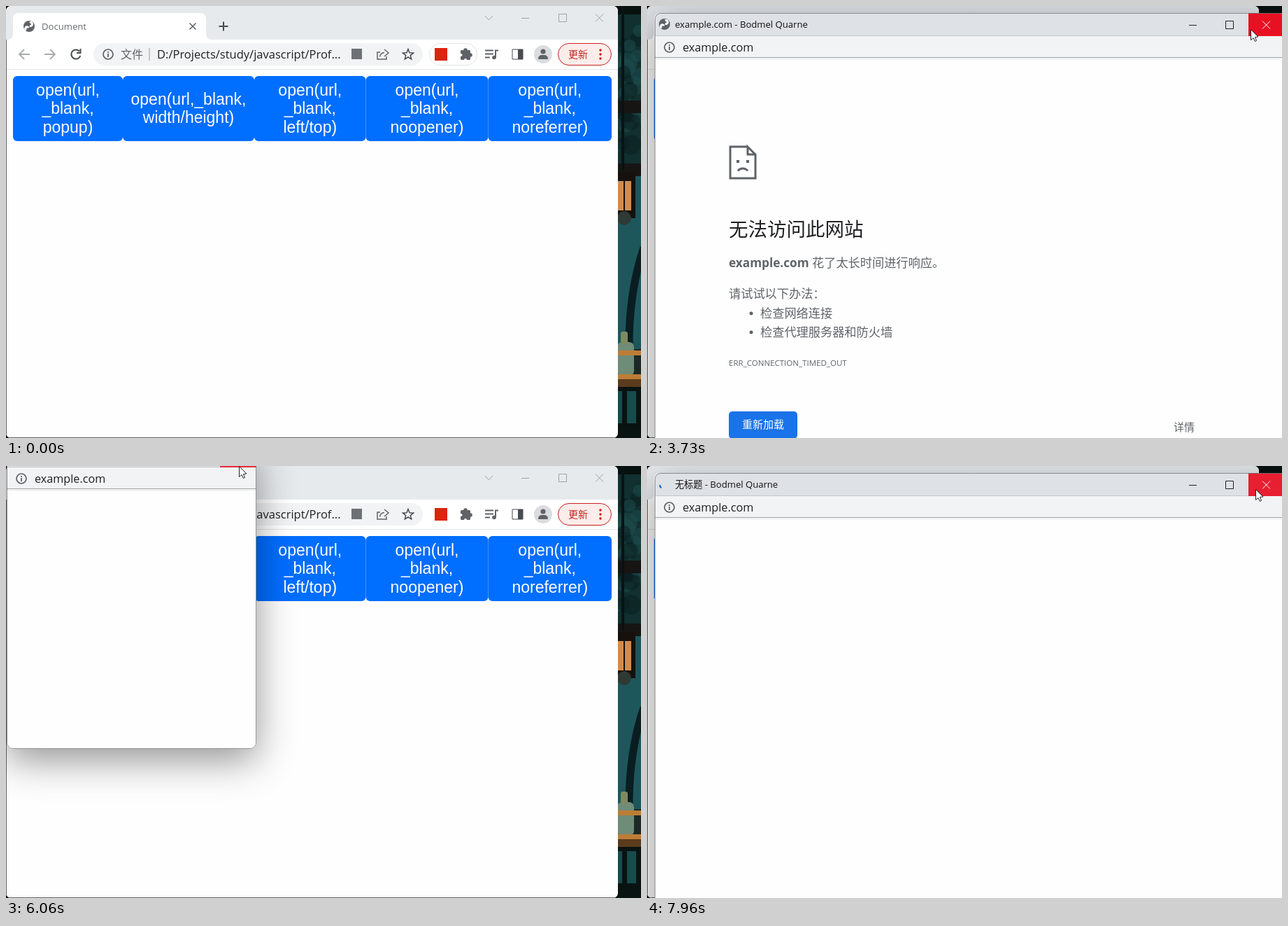
An HTML page with a canvas that plays this animation: 908x617 px, repeating every 8 s.

```html
<!DOCTYPE html>
<html lang="zh">
<head>
<meta charset="utf-8">
<title>window.open</title>
<style>
html, body { margin: 0; width: 100%; height: 100%; overflow: hidden; background: #07110f; }
canvas { display: block; }
</style>
</head>
<body>
<canvas id="stage" width="908" height="617"></canvas>
<script>
const W = 908, H = 617, LOOP = 8000, TAU = 2 * Math.PI;
const makeCanvas = () => Object.assign(document.createElement('canvas'), { width: W, height: H });
const screen2d = document.getElementById('stage').getContext('2d');
const layer = makeCanvas(), layer2d = layer.getContext('2d');
let c = screen2d;

const UI = '"Open Sans","Noto Sans CJK SC","Noto Sans CJK",sans-serif';
const ARIAL = '"Liberation Sans",Arial,sans-serif';
const BROWSER = 'Bodmel Quarne';
const GREY = '#5f6368', DARK = '#484b4f', INK = '#202124', RED = '#c5221f';

const clamp = v => Math.max(0, Math.min(1, v));
const mix = (a, b, p) => a + (b - a) * p;
const smooth = p => p * p * (3 - 2 * p);

// y is the middle of the capitals
function text(s, x, y, size, color, { align = 'left', font = UI, weight = 400 } = {}) {
  c.font = `${weight} ${size}px ${font}`;
  c.textAlign = align;
  c.fillStyle = color;
  c.fillText(s, x, y + size * 0.355);
}
function rect(x, y, w, h, fill) { c.fillStyle = fill; c.fillRect(x, y, w, h); }
function stroke(color, width = 1) { c.strokeStyle = color; c.lineWidth = width; c.stroke(); }
function box(x, y, w, h, r, fill, edge) {
  c.beginPath();
  c.roundRect(x, y, w, h, r);
  if (fill) { c.fillStyle = fill; c.fill(); }
  if (edge) stroke(edge);
}
function disc(x, y, r, fill) { c.beginPath(); c.arc(x, y, r, 0, TAU); c.fillStyle = fill; c.fill(); }
function arc(x, y, r, from, to, color, width) {
  c.beginPath(); c.arc(x, y, r, from, to); stroke(color, width);
}
function line(points, color, width = 1) {
  c.beginPath();
  for (const [x, y] of points) c.lineTo(x, y);
  stroke(color, width);
}
function cross(x, y, r, color, width = 1) {
  for (const s of [-1, 1]) line([[x - r, y - r * s], [x + r, y + r * s]], color, width);
}

function infoIcon(x, y) {
  arc(x, y, 7, 0, TAU, GREY, 1.7);
  rect(x - 0.9, y - 1, 1.8, 5, GREY);
  rect(x - 0.9, y - 4, 1.8, 1.9, GREY);
}
function globe(x, y) {
  disc(x, y, 8, GREY);
  arc(x - 3, y + 3, 2.2, 2, 6, '#fff', 3);
  arc(x + 2, y - 3, 2.5, -2, 2, '#fff', 3);
}
function windowButtons(x, y, gap, color, closeColor) {
  const min = x - 2 * gap;
  line([[min - 5.5, y + .5], [min + 5.5, y + .5]], color);
  box(Math.floor(x - gap - 5.5) + .5, y - 5.5, 11, 11, 0, null, color);
  cross(x, y, 5.5, closeColor);
}

// Night scene behind the window; only a strip at the right shows
function paintWallpaper() {
  const x = 874, w = W - x;
  let seed = 7;
  const rnd = () => (seed = seed * 16807 % 2147483647) / 2147483647;
  rect(0, 0, W, H, '#07110f');
  rect(x, 12, w, 215, '#11302f');
  rect(x, 238, w, 252, '#1d575c');
  for (let i = 0; i < 26; i++) {
    c.globalAlpha = 0.5;
    disc(x + w * rnd(), 25 + 190 * rnd(), 5 + 10 * rnd(), i % 2 ? '#0a1c1d' : '#1e4d50');
  }
  c.globalAlpha = 1;
  for (const y of [135, 225]) rect(x, y, w, 18, '#161514');
  rect(880, 0, 4, 235, '#081313');

  rect(x, 237, 26, 66, '#16110d');
  for (const px of [x, 885]) rect(px, 250, 9, 42, '#d08c50');
  disc(884, 303, 10, '#303a35');

  c.beginPath(); c.moveTo(912, 345); c.quadraticCurveTo(890, 410, 891, 492); stroke('#0a1d20', 11);
  rect(x, 490, w, 54, '#1c2a26');
  box(x, 480, 24, 48, 7, '#6f8c78');
  box(879, 465, 10, 18, 3, '#7f8a62');
  for (const y of [492, 526]) rect(x, y, w, 7, '#bd7d35');
  rect(x, 533, w, 11, '#5a3c1d');
  rect(x, 544, w, 73, '#091311');
  for (const px of [868, 888]) rect(px, 550, 13, 46, '#184b4c');
}
const backdrop = makeCanvas();
c = backdrop.getContext('2d');
paintWallpaper();

function arrow(x, dir) {
  const tip = x + 7.5 * dir;
  line([[x - 7.5 * dir, 69], [tip, 69]], '#a7aaad', 1.8);
  line([[tip - 7 * dir, 62], [tip, 69], [tip - 7 * dir, 76]], '#a7aaad', 1.8);
}
function star(x, y) {
  c.beginPath();
  for (let i = 0; i < 10; i++) {
    const a = i * TAU / 10 - TAU / 4, r = i % 2 ? 3.5 : 8;
    c.lineTo(x + r * Math.cos(a), y + r * Math.sin(a));
  }
  c.closePath();
  stroke(DARK, 1.5);
}
function toolbar(pill) {
  arrow(26.5, -1);
  arrow(62.5, 1);
  arc(100, 69, 6.6, 0.3, 5.6, DARK, 2);
  line([[106.5, 61], [106.5, 67], [101, 67]], DARK, 2);

  box(125, 53, 471, 32, 16, '#f1f3f4');
  infoIcon(146, 69);
  text('文件', 164, 69, 16, GREY);
  rect(204.5, 60, 1, 18, '#9a9da1');
  text('D:/Projects/study/javascript/Prof...', 216, 69, 16.5, INK);
  rect(494, 61, 15, 15, '#6d7175');
  line([[535, 66], [531, 66], [531, 76], [544, 76], [544, 72]], GREY, 1.5);
  arc(541, 73, 6.5, 3.2, 4.7, GREY, 1.5);
  line([[541, 62], [547, 67], [541, 72]], GREY, 1.5);
  star(575, 69.5);

  if (pill) box(605.5, 53.5, 68, 31, 16, '#fff', '#e1e3e6');
  rect(613, 60, 18, 18, '#dc2410');
  box(650, 63, 14, 14, 1.5, GREY);
  disc(657, 63, 2.8, GREY); disc(664, 70, 2.8, GREY);
  disc(650.5, 70, 2, '#fff'); disc(657, 77, 2, '#fff');
  for (let i = 0; i < 3; i++) rect(685, 62.5 + 5 * i, i < 2 ? 12 : 7, 2, GREY);
  line([[704, 63.5], [700, 63.5], [700, 73]], GREY, 2);
  disc(698, 73.5, 2.8, GREY);
  box(724, 62, 15, 14, 0, null, DARK);
  rect(732, 62, 7, 14, DARK);
  disc(768, 69, 13, '#dadce0');
  disc(768, 65, 3.6, GREY);
  box(761, 70, 14, 6, [5, 5, 1, 1], GREY);
  box(789.5, 53.5, 76, 31, 15.5, '#fcecea', RED);
  text('更新', 804, 69.5, 14, RED);
  for (let i = -1; i < 2; i++) disc(850, 69 + 6 * i, 1.8, RED);
}

function pageButtons() {
  const labels = ['|popup)', 'width/height)', '|left/top)', '|noopener)', '|noreferrer)'];
  const edges = [10, 167, 355, 514.5, 689.5, 866];
  labels.forEach((label, n) => {
    const x = edges[n], w = edges[n + 1] - x;
    box(x, 100, w, 93, 6, '#006eff');
    const rows = (label[0] === '|' ? 'open(url,|_blank,' : 'open(url,_blank,|') + label;
    rows.split('|').forEach((row, i, all) =>
      text(row, x + w / 2, 146.1 + 26.4 * (i - (all.length - 1) / 2), 23, '#fff', { align: 'center', font: ARIAL }));
  });
}

function mainWindow(active, pill) {
  const ink = active ? INK : '#a0a3a7';
  const bar = active ? '#dee1e6' : '#e7eaed';
  c.save();
  c.beginPath(); c.roundRect(0, 0, 875, H, 7); c.clip();
  rect(0, 0, 875, H, '#fefefe');
  rect(0, 0, 875, 48, bar);
  box(10, 10, 276, 46, 8, '#fff');
  for (const x of [2, 286]) rect(x, 40, 8, 8, '#fff');
  for (const x of [2, 294]) disc(x, 40, 8, bar);
  rect(0, 48, 875, 42, '#fff');
  globe(33, 29);
  text('Document', 51, 29, 13.1, active ? '#303236' : '#66696d');
  cross(267, 29, 4.5, active ? INK : GREY, 1.6);
  rect(304.5, 28, 13, 2, DARK);
  rect(310, 22.5, 2, 13, DARK);
  line([[685, 14], [690.5, 20], [696, 14]], ink);
  windowButtons(848.5, 17, 53, ink, ink);
  toolbar(pill);
  rect(0, 90, 875, 1, '#e3e5e8');
  pageButtons();
  rect(0, 48, 1, H, '#5d6263');
  rect(0, H - 1, 875, 1, '#5d6263');
  c.restore();
}

function errorPage() {
  const x = 117, size = 17.2;
  line([[144, 201], [119, 201], [119, 246], [155, 246], [155, 212], [144, 201], [144, 212], [155, 212]], GREY, 3);
  for (const px of [128, 142]) rect(px, 220, 4, 4, GREY);
  arc(137, 241, 9, 3.8, 5.6, GREY, 3);
  text('无法访问此网站', x, 319, 27.5, INK);
  text('example.com', x, 367, size, GREY, { weight: 700 });
  text('花了太长时间进行响应。', x + c.measureText('example.com ').width, 367, size, GREY);
  text('请试试以下办法：', x, 411, size, GREY);
  ['检查网络连接', '检查代理服务器和防火墙'].forEach((s, i) => {
    disc(149, 439 + 27 * i, 2.5, GREY);
    text(s, 162, 439 + 27 * i, size, GREY);
  });
  text('ERR_CONNECTION_TIMED_OUT', x, 510, 11.5, GREY);
  box(x, 579, 98, 39, 5, '#1a73e8');
  text('重新加载', x + 49, 598, 15, '#fff', { align: 'center' });
  text('详情', 768, 602, 15, GREY, { align: 'center' });
}

function spinner(x, y, age) {
  const mid = 3.58 + 0.0074 * (age - 160);
  const half = 1.13 + 0.79 * Math.cos(TAU * (age - 160) / 1333);
  arc(x, y, 7, mid - half, mid + half, '#2f6fca', 2.4);
}

const BIG = { x: 11, y: 10, w: 901, h: 760 };
const SMALL = { x: 1, y: -31, w: 357, h: 435 };
const POPUPS = [
  { ...BIG, open: 1120, close: 3740, loaded: 3000, hover: 2230 },
  { ...SMALL, open: 4230, close: 6380, loaded: LOOP, hover: 5950 },
  { ...BIG, open: 7080, close: LOOP, loaded: LOOP, hover: 7840 }
];

function popup(p, t) {
  const { x, y, w, h } = p, cx = x + w / 2, cy = y + h / 2;
  const age = t - p.open, rise = clamp(age / 270), fall = clamp((t - p.close) / 167);
  if (age < 0 || fall === 1) return;
  const scale = 1 - 0.1 * (1 - rise) ** 3 - 0.045 * fall;
  const hover = clamp((t - p.hover) / 130), done = t >= p.loaded;

  c = layer2d;
  c.clearRect(0, 0, W, H);
  c.save();
  c.translate(cx, cy); c.scale(scale, scale); c.translate(-cx, -cy);
  c.shadowColor = 'rgba(0,0,0,.42)'; c.shadowBlur = 54; c.shadowOffsetY = 16;
  box(x, y, w, h, 8, '#fefefe');
  c.shadowColor = 'transparent';
  c.save();
  c.clip();
  rect(x, y, w, 33, '#dee1e6');
  rect(x, y + 33, w, 31, '#f1f3f4');
  rect(x, y + 32, w, 1, '#c3c6ca');
  rect(x, y + 63, w, 1, '#a0a3a6');
  rect(x, y + 65, w, 1, '#e4e5e7');
  c.globalAlpha = hover;
  rect(x + w - 52, y, 52, 33, '#e81123');
  c.globalAlpha = 1;
  if (done) globe(x + 14, y + 16); else spinner(x + 14, y + 16, age);
  text(`${done ? 'example.com' : '无标题'} - ${BROWSER}`, x + 29, y + 16, 13.1, '#111');
  windowButtons(x + w - 26.5, y + 17, 52.5, INK, hover > .5 ? '#fff' : INK);
  infoIcon(x + 21, y + 49);
  text('example.com', x + 40, y + 49, 16.2, INK);
  if (done) errorPage();
  c.restore();
  box(x + .5, y + .5, w - 1, h - 1, 8, null, 'rgba(110,114,118,.75)');
  c.restore();

  c = screen2d;
  c.globalAlpha = clamp(rise * 1.8) * (1 - fall);
  c.drawImage(layer, 0, 0);
  c.globalAlpha = 1;
}

// pointer stops: arrive, leave, x, y
const STOPS = [
  [120, 120, 833, 618], [880, 1380, 106, 157], [1720, 1720, 690, 46], [2250, 2250, 878, 2],
  [2500, 3690, 888, 29], [3900, 3900, 636, 69], [4130, 4480, 290, 150], [4720, 4720, 458, 86],
  [4900, 4900, 570, 70], [5270, 5300, 335, 9], [5700, 6400, 333, 0], [6760, 6760, 408, 96],
  [6920, 7180, 428, 142], [7960, LOOP, 870, 33]
];
function pointer(t) {
  const i = STOPS.findLastIndex(s => s[0] <= t);
  if (i < 0) return;
  const [, leave, x0, y0] = STOPS[i];
  const [arrive, , x1, y1] = STOPS[i + 1] || STOPS[i];
  const p = t <= leave ? 0 : smooth((t - leave) / (arrive - leave));
  c.save();
  c.translate(Math.round(mix(x0, x1, p)) + .5, Math.round(mix(y0, y1, p)) + .5);
  c.beginPath();
  for (const [x, y] of [[0, 0], [0, 15], [3.5, 12], [6, 17], [8, 16], [6, 11], [10.5, 10.5]]) c.lineTo(x, y);
  c.closePath();
  c.fillStyle = '#fff'; c.fill();
  stroke('#222');
  c.restore();
}

// The main window gets focus on a click and loses it to each popup
const FOCUS = [945, 3720, 6380];
const isActive = t => POPUPS.some((p, i) => t >= FOCUS[i] && t < p.open);

function draw(t) {
  c = screen2d;
  c.drawImage(backdrop, 0, 0);
  mainWindow(isActive(t), t < 4000);
  for (const p of POPUPS) popup(p, t);
  pointer(t);
}

const start = performance.now();
function tick() {
  draw((performance.now() - start) % LOOP);
  requestAnimationFrame(tick);
}
tick();
</script>
</body>
</html>
```
